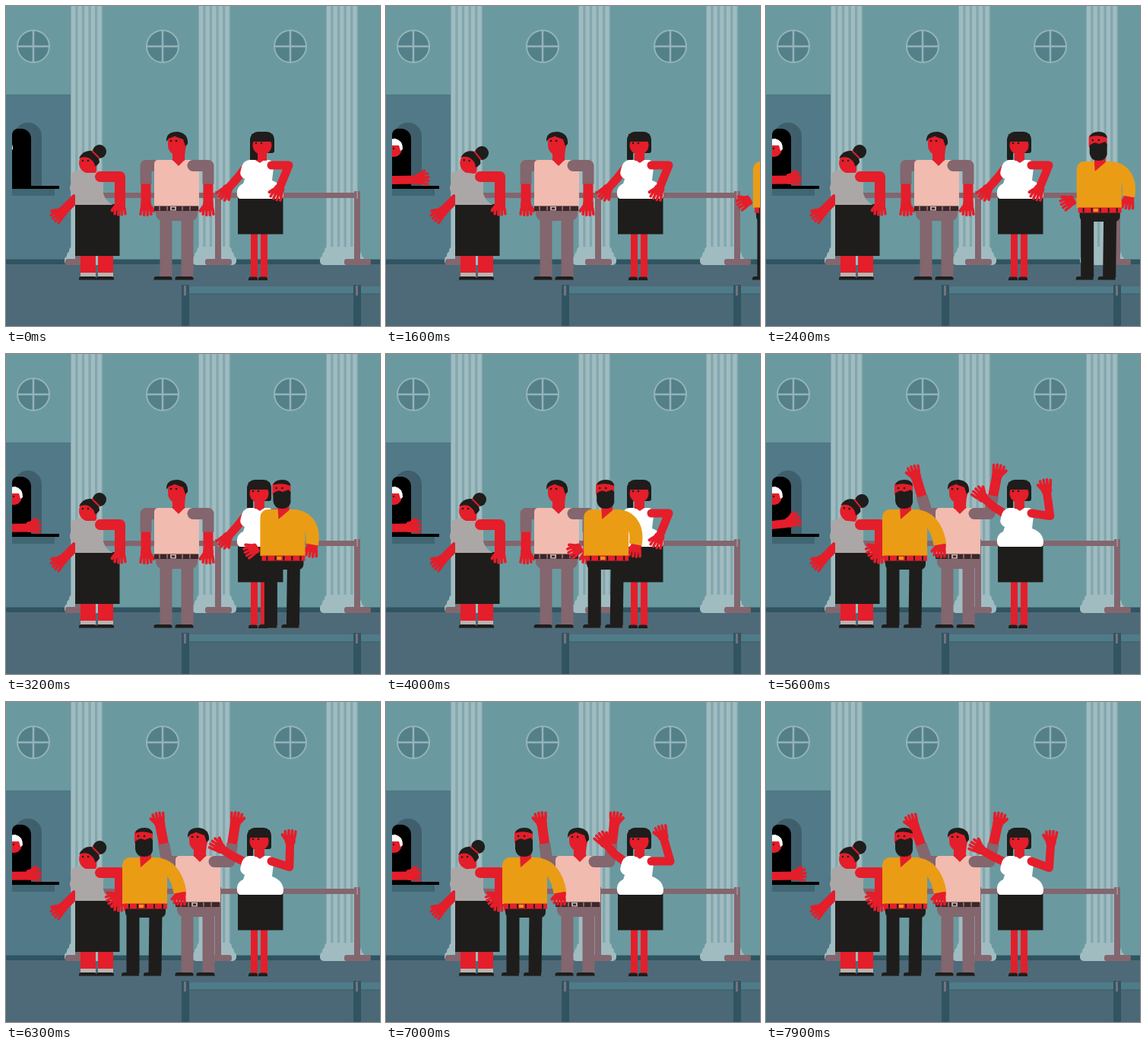
Write an HTML page with a canvas that moves like this. It is 492x420 px and loops after 8000 ms.

```html
<!DOCTYPE html>
<html lang="en">
<head>
<meta charset="utf-8">
<title>The queue</title>
<style>
html, body { margin: 0; width: 100%; height: 100%; overflow: hidden; background: #6a9aa0; }
canvas { display: block; width: 492px; height: 420px; }
</style>
</head>
<body>
<canvas id="stage" width="492" height="420"></canvas>
<script>
const c = document.getElementById('stage').getContext('2d');
const LOOP = 8000, TAU = Math.PI * 2;
const RED = '#e41e2a', INK = '#1e1d1b', PLUM = '#83666e', PINK = '#f1bbaf';
const GREY = '#aba7a6', GOLD = '#eb9c15', WHITE = '#ffffff', STONE = '#a0bcc1';

const rad = d => d * Math.PI / 180;
const mix = (a, b, k) => a + (b - a) * k;
const ease = k => { k = Math.min(1, Math.max(0, k)); return k * k * (3 - 2 * k); };
const span = (t, a, b) => ease((t - a) / (b - a));
// Smooth bump, 1 at the middle
const pulse = (t, mid, half) => ease(1.25 - Math.abs(t - mid) / half);

function rect(col, x, y, w, h, r = 0) {
  c.fillStyle = col;
  c.beginPath();
  c.roundRect(x, y, w, h, r);
  c.fill();
}
function disc(col, x, y, rx, ry = rx) {
  c.fillStyle = col;
  c.beginPath();
  c.ellipse(x, y, rx, ry, 0, 0, TAU);
  c.fill();
}
function shape(col, d) {
  c.fillStyle = col;
  c.fill(new Path2D(d));
}
function line(col, w, pts, cap = 'butt') {
  c.strokeStyle = col;
  c.lineWidth = w;
  c.lineCap = cap;
  c.lineJoin = 'round';
  c.beginPath();
  pts.forEach(p => c.lineTo(p[0], p[1]));
  c.stroke();
}
function at(x, y, deg, draw) {
  c.save();
  c.translate(x, y);
  c.rotate(rad(deg));
  draw();
  c.restore();
}
function eyes(x, y, gap = 7) {
  disc(INK, x, y, 1.3);
  disc(INK, x + gap, y, 1.3);
}
function shoe(x, y, w) {
  rect(INK, x, y, w, 4.5, [3, 3, 0, 0]);
}
// Points along deg; the thumb sits on the given side
function hand(x, y, deg, thumb) {
  at(x, y, deg, () => {
    c.scale(1.15, 1.15);
    rect(RED, -3, -6, 11, 12, 3);
    for (let i = -1.5; i < 2; i++) line(RED, 3.1, [[5, i * 3.3], [13.5 - Math.abs(i), i * 4]], 'round');
    line(RED, 3.6, [[1, thumb * 4], [8, thumb * 9]], 'round');
  });
}
// Jointed arm; each bone is [length, degrees]
function arm(x, y, w, bones, thumb) {
  const pts = [[x, y]];
  for (const [len, deg] of bones) {
    x += len * Math.cos(rad(deg));
    y += len * Math.sin(rad(deg));
    pts.push([x, y]);
  }
  line(RED, w, pts, 'round');
  hand(x, y, bones.at(-1)[1], thumb);
}

function roundWindow(x) {
  disc('#548089', x, 53, 21);
  c.strokeStyle = '#94b4b9';
  c.lineWidth = 2;
  c.stroke();
  line('#94b4b9', 2.5, [[x - 21, 53], [x + 21, 53]]);
  line('#94b4b9', 2.5, [[x, 32], [x, 74]]);
}
function column(x) {
  rect('#82a8ae', x, 0, 42, 320);
  for (let i = 0; i < 5; i++) rect(STONE, x + 1 + i * 8.6, 0, 5.2, 320);
  for (let i = 0; i < 3; i++) rect(STONE, x - 2 - i * 3, 316 + i * 6, 46 + i * 6, 12, 5);
}
function post(x) {
  rect(PLUM, x, 243, 8, 92);
  rect('#a18790', x + 3, 243, 2, 10);
  rect(PLUM, x - 13, 332, 35, 8, 3);
}
function backdrop() {
  rect('#6a9aa0', 0, 0, 492, 340);
  [36, 206, 374].forEach(roundWindow);
  rect('#527987', 0, 116, 85, 217);
  rect('#305461', 0, 332.5, 492, 7);
  rect('#4e6a78', 0, 339, 492, 81);
  [85, 253, 421].forEach(column);
  rect('#3f5f6c', 11, 153, 36, 83, [18, 18, 0, 0]);
  rect('#000000', 8, 161, 25, 75, [8, 13, 0, 0]);
  rect(PLUM, 90, 245, 372, 7);
  [91, 275, 458].forEach(post);
}
function frontBarrier() {
  rect('#4a6875', 236, 378, 256, 42);
  rect('#4e7b87', 238, 368, 254, 10);
  rect('#426673', 238, 377, 254, 2);
  for (const x of [231, 457]) {
    rect('#315462', x, 366, 10, 54);
    rect('#76717c', x + 3, 367, 3, 13);
  }
}

function teller(t) {
  const hidden = 1 - span(t, 500, 1300);
  const x = 10 - 13 * hidden;
  const wx = 30 + 11 * pulse(t, 1600, 600) + 7 * pulse(t, 8000, 600) - 70 * hidden;
  const lift = 6 * pulse(t, 5600, 600);
  c.save();
  c.beginPath();
  c.rect(8, 140, 90, 98);
  c.clip();
  disc(RED, x, 187, 11);
  shape(WHITE, `M${x - 12} 183 Q${x - 8} 174 ${x + 2} 174 Q${x + 12} 176 ${x + 12} 188 L${x + 9} 190 L${x + 7} 183 Z`);
  disc(INK, x, 187, 1.2);
  line(RED, 11, [[-30, 229], [wx, 228 - lift]]);
  hand(wx, 227 - lift, -3 * lift, -1);
  c.restore();
  rect('#000000', 8, 236, 62, 4);
  rect('#3f6672', 8, 240, 56, 9);
}

function oldLady(t) {
  arm(96, 248, 12, [[31, 135]], 1);
  for (const x of [98, 121]) {
    rect(RED, x, 326, 20, 26);
    rect('#b9b4b2', x, 350, 20, 6);
    shoe(x - 2, 355, 23);
  }
  rect(INK, 91, 260, 58.5, 68);
  shape(GREY, 'M98 213 L128 217 V246 Q131 257 141 261 H91 V248 Q83 245 84 238 Q85 233 87 231 Q80 218 96 216 Z');
  arm(124, 224, 14, [[26, 0], [35, 90]], 1);
  const nod = 7 * pulse(t, 1600, 700) + 7 * pulse(t, 5600, 700) - 4 * pulse(t, 7000, 700);
  at(108, 217, nod, () => {
    disc(RED, 0, -11, 12, 13);
    rect(RED, -5, -8, 16, 10, 3);
    shape(INK, 'M-12 -17 Q-7 -28 4 -27 Q14 -25 15 -12 Q12 -7 9 -7 Q8 -14 0 -18 Q-6 -20 -12 -17 Z');
    disc(INK, 15, -26, 9);
    line(RED, 2, [[5, -27], [15, -17]]);
    eyes(-7, -14);
  });
}

// Forearm turns about the elbow, half of it covered by the sleeve
function shirtArm(x, inner, deg, thumb) {
  const p = d => [x + Math.cos(rad(deg)) * d, 209.5 + Math.sin(rad(deg)) * d];
  line(RED, 13, [p(20), p(51)]);
  hand(...p(50), deg, thumb);
  disc(PLUM, inner, 209.5, 7.5);
  line(PLUM, 15, [[inner, 209.5], [x, 209.5], p(24)]);
}
function pinkMan(t) {
  const step = span(t, 4450, 5150), up = span(t, 4650, 5350);
  const wave = Math.cos((t - 7000) / 600 * TAU), k = Math.sin(Math.PI * step);
  c.save();
  c.translate(28 * step, 0);
  shirtArm(184, 198, mix(90, 256 + 6 * wave, up), -1);
  for (const d of [-1, 1]) {
    const x = 224.5 + d * (14 + 5 * k), y = 355 - (1 + d) * k;
    rect(PLUM, x - 8, 268, 16, y - 267);
    shoe(x - 16, y, 24);
  }
  rect(PLUM, 197, 266, 55, 16, [0, 0, 9, 9]);
  rect(PINK, 195, 202, 59, 61, [5, 5, 0, 0]);
  rect('#3b2729', 195, 262.5, 58, 6.5);
  for (let x = 201; x < 250; x += 10) rect(PLUM, x, 263, 2, 5.5);
  rect('#b9a6a8', 216, 263, 8, 5.5);
  rect('#3b2729', 218, 264.5, 4, 2.5);
  shape(RED, 'M218 201 L236 201 L227 210 Z');
  shape(RED, 'M213 172 L237 170 V184 Q235 191 235 203 H219 V194 Q213 190 213 182 Z');
  shape(INK, 'M211 178 Q210 165 226 165 Q240 167 239 181 L236 184 L233 175 L222 171 L214 174 Z');
  eyes(217, 177);
  shirtArm(266, 246, mix(90, -80 - 2.5 * wave, up), 1);
  c.restore();
}

function woman(t) {
  const up = span(t, 4750, 5450);
  const w = (1 - Math.cos((t - 7000) / 1800 * TAU)) / 2;
  const side = up > 0.5 ? 1 : -1;
  for (const x of [322, 335]) {
    rect(RED, x, 298, 9, 59);
    shoe(x - 3, 355.5, 12);
  }
  rect(INK, 305, 252, 59.5, 47.5);
  arm(316, 211, 11, [[19, mix(128, 217 - 12 * w, up)], [19, mix(132, 229 - 19 * w, up)]], side);
  rect(RED, 327, 192, 13, 14);
  shape(WHITE, 'M320 202 H346 Q352 203 352 212 L350 229 Q364 234 365 246 Q365 252 362 253 H307 Q303 250 304 243 Q305 236 312 233 L314 227 Q306 223 309 215 Q311 203 320 202 Z');
  shape(RED, 'M326 201 H341 L334 206 Z');
  arm(349, 209, 11, [[23 + 2 * up, 20 * w * up], [33, mix(112, -106 + 20 * w, up)]], -side);
  const dx = 4 * (1 - span(t, 500, 1300));
  at(333 + dx, 200, 0, () => {
    rect(INK, -16, -35, 32, 28, [11, 10, 3, 0]);
    rect(INK, -16, -18, 8 + dx, 20, 1);
    disc(RED, 0, -17, 12.5, 12);
    rect(RED, -6, -10, 12, 13);
    rect(INK, -14, -32, 28, 10);
    eyes(-8, -20);
  });
}

function walker(t) {
  if (t < 1000) return;
  const x = Math.max(181, 511 - 0.0928 * (t - 1600));
  const ph = Math.min(t, 5200) / 800 * TAU;
  const s = Math.cos(ph), v = Math.sin(ph), wx = 43 - 4 * s;
  c.save();
  c.translate(x, 0);
  for (const d of [-1, 1]) {
    const f = 0.5 + d * 14.5 * s, y = 356 - 4 * Math.max(0, d * v);
    line(INK, 17, [[1 + d * 15 * s, 274], [f, y]]);
    shoe(f - 15, y - 1, 23);
  }
  rect(INK, -24, 270, 53, 13, [0, 0, 7, 7]);
  hand(wx + 2, 251, 98, 1);
  c.strokeStyle = GOLD;
  c.lineWidth = 17;
  c.lineCap = 'butt';
  c.stroke(new Path2D(`M12 213 C32 211 44 226 ${wx + 1} 250`));
  rect(GOLD, -28, 204, 59, 61, [10, 14, 0, 0]);
  rect(RED, -26, 264.5, 57, 7);
  for (let i = -20; i < 30; i += 11) rect(INK, i, 265, 2, 6);
  rect(GOLD, -6, 266, 6, 4);
  hand(-34, 255, 150, 1);
  shape(RED, 'M-5 200 H10 V205 L-4 217 Z');
  rect(RED, -12, 168, 24, 20, 5);
  shape(INK, 'M-11 172 Q-9 165 1 165 Q11 165 12 173 Q0 168 -11 172 Z');
  shape(INK, 'M-11 183 Q-4 177 1 181 Q8 179 9 178 L12 181 V195 Q10 203 1 203 Q-10 203 -11 193 Z');
  eyes(-7, 176, 8);
  c.restore();
}

function draw(now) {
  const t = now % LOOP;
  backdrop();
  teller(t);
  oldLady(t);
  pinkMan(t);
  woman(t);
  walker(t);
  frontBarrier();
}
const start = performance.now();
function tick() {
  draw(performance.now() - start);
  requestAnimationFrame(tick);
}
tick();
</script>
</body>
</html>
```
